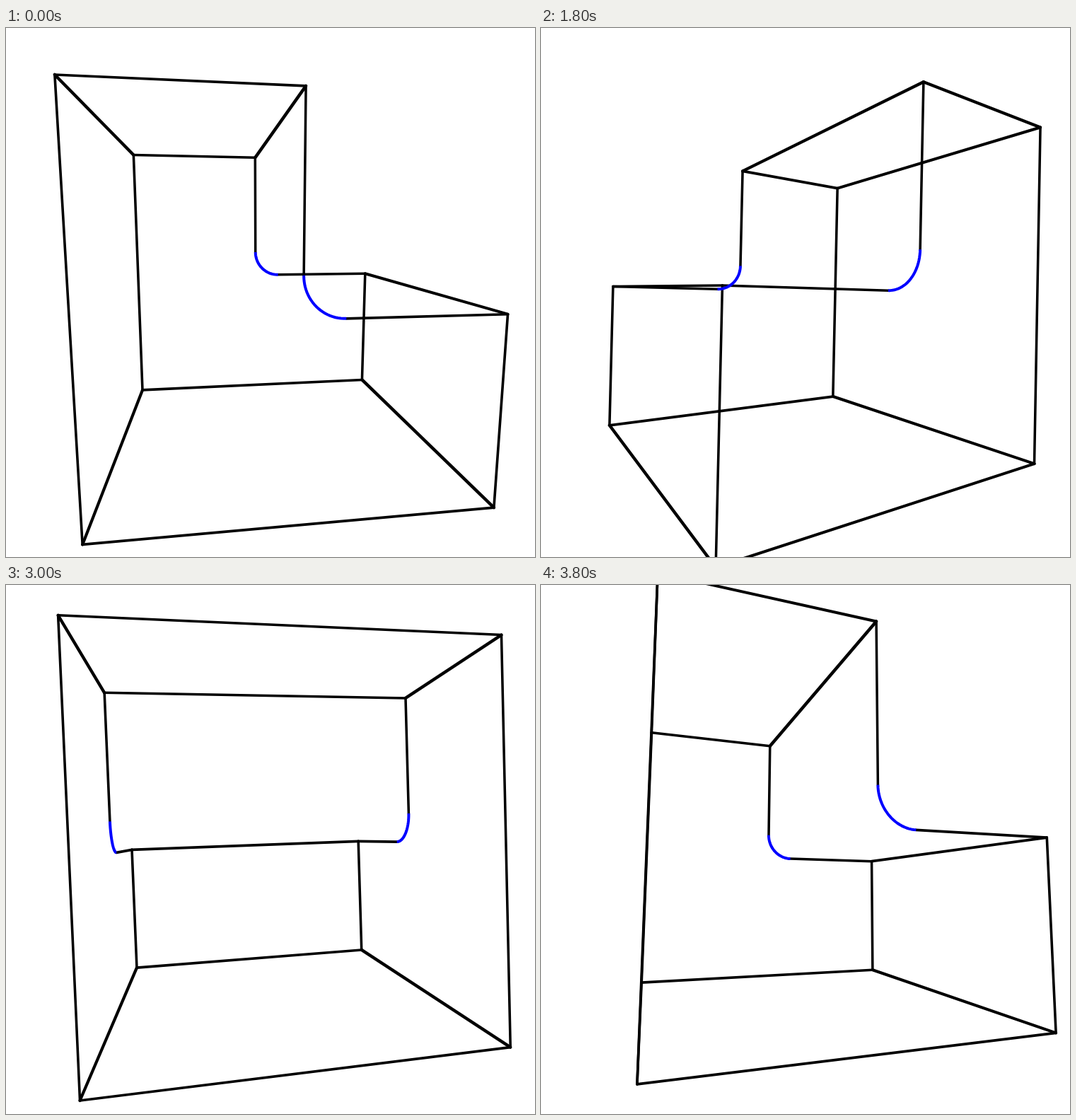
An HTML page with a canvas for the animation above (4 s loop, 748 by 748 pixels).

```html
<!DOCTYPE html>
<html lang="en">
<head>
<meta charset="utf-8">
<title>Filleted L-block</title>
<style>
  html, body { margin: 0; width: 100%; height: 100%; overflow: hidden; background: #fff; }
  canvas { display: block; }
</style>
</head>
<body>
<canvas id="stage" width="748" height="748"></canvas>
<script>
const ctx = document.getElementById('stage').getContext('2d');
const SIZE = 748, STEP = 200, STEPS = 20;
const FOCAL = 648, DIST = 3.03, CX = 373.7, CY = 371;
const FILLET = 0.2;
const SHIFT_X = 0.011, SHIFT_Z = -0.0095;

// Key poses of the hand-held turn; yaw in degrees, roll and pitch in milliradians.
const KEYS = [
  { at: 0, yaw: -8, roll: 1, pitch: 135 },
  { at: 1, yaw: 3.5, roll: -13, pitch: 100 },
  { at: 3, yaw: 40.9, roll: -42, pitch: -51 },
  { at: 6, yaw: 92.1, roll: 12, pitch: -38 },
  { at: 9, yaw: 146.9, roll: 22, pitch: -8 },
  { at: 13, yaw: 223.2, roll: -14, pitch: 28 },
  { at: 16, yaw: 278.1, roll: -40, pitch: 12 },
  { at: 18, yaw: 311.2, roll: -35, pitch: -40 },
  { at: 19, yaw: 340.9, roll: 6, pitch: -99 }
];

// Profile from the upper end of the fillet round to its lower end.
const PROFILE = [[0, FILLET], [0, 1], [-1, 1], [-1, -1], [1, -1], [1, 0], [FILLET, 0]];
const CORNERS = PROFILE.slice(1, -1);
const ARC = Array.from({ length: 25 }, (_, i) => {
  const a = Math.PI * (1 + i / 48);
  return [FILLET * (1 + Math.cos(a)), FILLET * (1 + Math.sin(a))];
});

// Tangent of one channel at key i; the shorter neighbouring span weighs more.
function tangent(name, i) {
  const slope = j => (KEYS[j + 1][name] - KEYS[j][name]) / (KEYS[j + 1].at - KEYS[j].at);
  if (i === 0) return slope(0);
  if (i === KEYS.length - 1) return slope(i - 1);
  const before = KEYS[i].at - KEYS[i - 1].at, after = KEYS[i + 1].at - KEYS[i].at;
  return (slope(i - 1) * after + slope(i) * before) / (before + after);
}

// Cubic Hermite curve through the keys.
function channel(name, step) {
  const next = Math.max(1, KEYS.findIndex(k => k.at >= step));
  const a = KEYS[next - 1], b = KEYS[next];
  const span = b.at - a.at, u = (step - a.at) / span, v = 1 - u;
  return v * v * (1 + 2 * u) * a[name] + u * u * (1 + 2 * v) * b[name] +
    span * u * v * (v * tangent(name, next - 1) - u * tangent(name, next));
}

function projector(step) {
  const yaw = channel('yaw', step) * Math.PI / 180;
  const roll = channel('roll', step) / 1000;
  const pitch = channel('pitch', step) / 1000;
  const turn = (a, b, angle) => {
    const c = Math.cos(angle), s = Math.sin(angle);
    return [a * c - b * s, a * s + b * c];
  };
  return ([x, y], z) => {
    let [right, near] = turn(x + SHIFT_X, z + SHIFT_Z, yaw);
    let up;
    [up, near] = turn(y, near, pitch);
    [up, right] = turn(up, right, roll);
    const k = FOCAL / (DIST - near);
    return [CX + right * k, CY - up * k];
  };
}

// Slanted edges are drawn a little heavier than level or upright ones.
function line(a, b) {
  const angle = Math.atan2(b[1] - a[1], b[0] - a[0]);
  ctx.lineWidth = 3.5 + Math.abs(Math.sin(2 * angle));
  ctx.beginPath();
  ctx.moveTo(...a);
  ctx.lineTo(...b);
  ctx.stroke();
}

function draw(step) {
  const project = projector(step);
  ctx.fillStyle = '#fff';
  ctx.fillRect(0, 0, SIZE, SIZE);
  ctx.lineCap = ctx.lineJoin = 'round';

  ctx.strokeStyle = '#000';
  for (const z of [-1, 1]) {
    const pts = PROFILE.map(p => project(p, z));
    for (let i = 1; i < pts.length; i++) line(pts[i - 1], pts[i]);
  }
  for (const p of CORNERS) line(project(p, -1), project(p, 1));

  ctx.strokeStyle = '#00f';
  ctx.lineWidth = 4;
  ctx.lineCap = 'butt';
  for (const z of [-1, 1]) {
    ctx.beginPath();
    for (const p of ARC) ctx.lineTo(...project(p, z));
    ctx.stroke();
  }
}

const start = performance.now();
function tick() {
  const elapsed = Math.max(0, performance.now() - start);
  draw(Math.floor(elapsed / STEP) % STEPS);
  requestAnimationFrame(tick);
}
tick();
</script>
</body>
</html>
```
